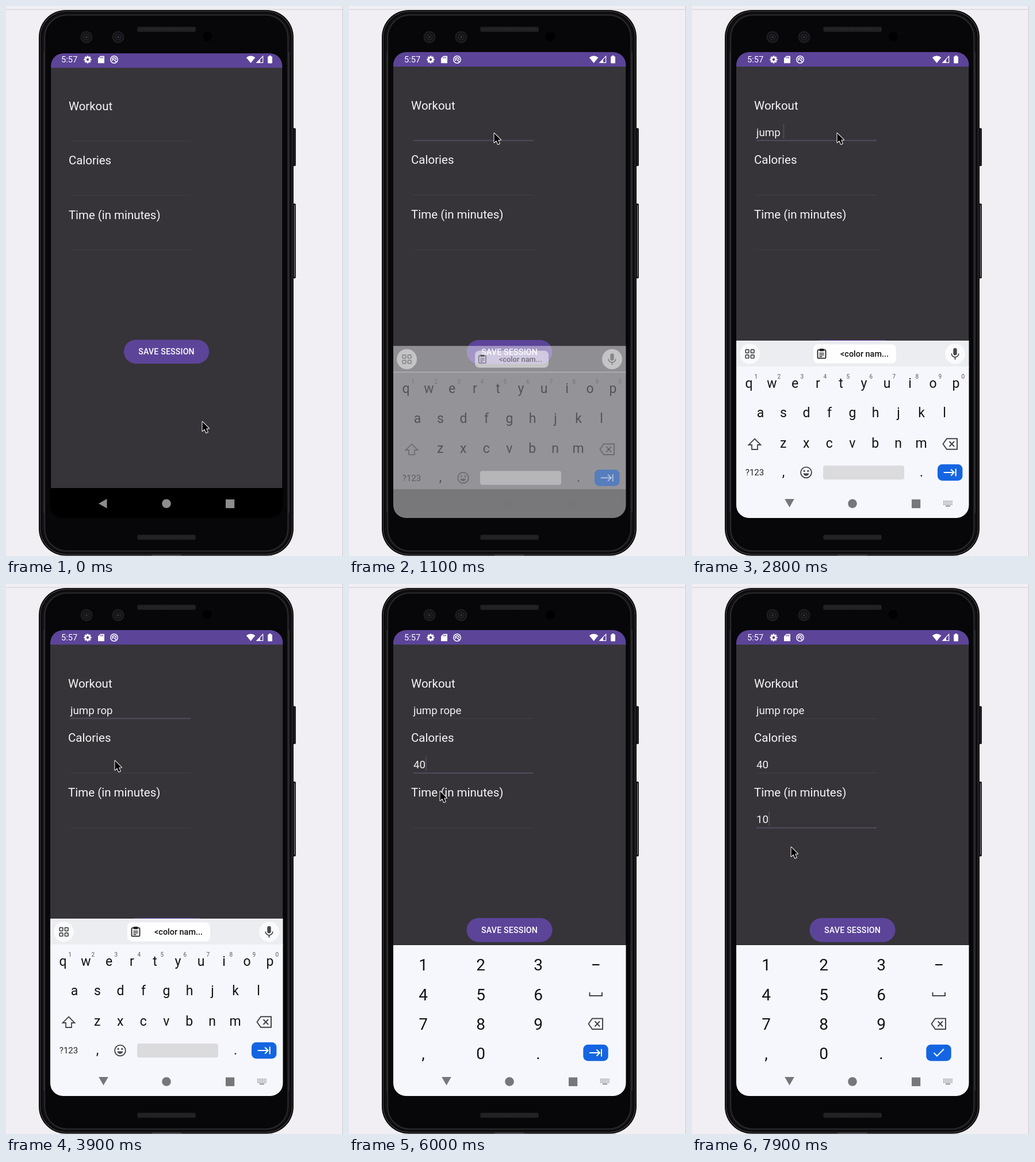
Animation of 586x955 px, one loop 8 s. Source, as an HTML page with a canvas:

```html
<!DOCTYPE html>
<html lang="en">
<head>
<meta charset="utf-8">
<title>Workout form</title>
<style>
html, body { margin: 0; width: 100%; height: 100%; overflow: hidden; background: #f1eff3; }
canvas { display: block; width: 586px; height: 955px; }
</style>
</head>
<body>
<canvas id="stage"></canvas>
<script>
const W = 586, H = 955, LOOP = 8000, STEP = 100;
const canvas = document.getElementById('stage');
const dpr = window.devicePixelRatio || 1;
canvas.width = W * dpr;
canvas.height = H * dpr;
const c = canvas.getContext('2d');

const PURPLE = '#5c4499', DARK = '#363438', KEYS = '#f6f7fc', INK = '#111214', ICON = '#44464b', BLUE = '#1565e2';

// [time, x, y]
const mousePath = [
  [0, 341, 721], [200, 341, 721], [850, 252, 220], [3600, 252, 220], [3900, 189, 306],
  [5800, 189, 306], [6000, 158, 359], [6250, 162, 405], [6800, 162, 405], [7100, 172, 456]
];
const fields = [
  { label: 'Workout', y: 233.5, focus: 1000, blur: 4500, value: 'jump rope',
    typed: [1900, 2000, 2150, 2300, 2500, 3000, 3150, 3300, 4000] },
  { label: 'Calories', y: 328.3, focus: 4500, blur: 6400, value: '40', typed: [5500, 5700] },
  { label: 'Time (in minutes)', y: 423.4, focus: 6400, blur: LOOP, value: '10', typed: [7300, 7500] }
];

const clamp = v => Math.max(0, Math.min(1, v));
const easeOut = p => 1 - (1 - p) ** 3;
const smooth = p => p * p * (3 - 2 * p);

function rect(x, y, w, h, color) {
  c.fillStyle = color;
  c.fillRect(x, y, w, h);
}
function roundPath(x, y, w, h, r) {
  c.beginPath();
  c.roundRect(x, y, w, h, r);
}
function box(x, y, w, h, r, color) {
  roundPath(x, y, w, h, r);
  c.fillStyle = color;
  c.fill();
}
function frame(x, y, w, h, r, color, lw) {
  roundPath(x, y, w, h, r);
  c.strokeStyle = color;
  c.lineWidth = lw;
  c.stroke();
}
function disc(x, y, r, color) {
  c.beginPath();
  c.arc(x, y, r, 0, Math.PI * 2);
  c.fillStyle = color;
  c.fill();
}
function ring(x, y, r, color, lw) {
  c.beginPath();
  c.arc(x, y, r, 0, Math.PI * 2);
  c.strokeStyle = color;
  c.lineWidth = lw;
  c.stroke();
}
function trace(points, close) {
  c.beginPath();
  points.forEach(([x, y]) => c.lineTo(x, y));
  if (close) c.closePath();
}
function poly(points, color) {
  trace(points, true);
  c.fillStyle = color;
  c.fill();
}
function line(points, color, lw, close) {
  trace(points, close);
  c.strokeStyle = color;
  c.lineWidth = lw;
  c.stroke();
}
function text(str, x, y, size, color, align = 'left', weight = 400) {
  c.font = `${weight} ${size}px Roboto, "Open Sans", sans-serif`;
  c.textAlign = align;
  c.fillStyle = color;
  c.fillText(str, x, y);
}
function at(x, y, draw, scale = 1, angle = 0) {
  c.save();
  c.translate(x, y);
  c.rotate(angle);
  c.scale(scale, scale);
  draw();
  c.restore();
}

function speaker(y) {
  box(228, y, 102, 9, 3, '#1d1d1f');
  for (let x = 231; x < 329; x += 3) rect(x, y + 1.5, 1, 6, '#2c2c2e');
}
function camera(x) {
  disc(x, 54, 10.5, '#1e1e20');
  disc(x, 54, 8, '#111114');
  ring(x, 54, 5, '#2a2b31', 1.2);
  disc(x, 54, 2.2, '#292d39');
}
function phone() {
  rect(0, 0, W, H, '#f1eff3');
  rect(0, 5.5, W, 1, '#cfcdd1');
  rect(585, 0, 1, H, '#c9c7cb');
  box(498, 212, 6, 66, 2, '#1b1b1d');
  box(498, 343, 6, 130, 2, '#1b1b1d');
  rect(501, 346, 1.2, 124, '#77777a');
  box(57, 7, 443, 947.5, 47, '#070708');
  frame(59.5, 9.5, 438, 942.5, 45, '#343437', 1.6);
  box(62, 12, 433, 937.5, 43, '#101012');
  frame(67, 15.5, 423.5, 931, 39, '#29292c', 2);
  box(69, 17, 419.5, 928, 37, '#070709');
  rect(65.5, 80, 1, 800, '#3d3d40');
  rect(491.5, 80, 1, 800, '#3d3d40');
  box(253, 951.5, 52, 2.5, 1, '#303033');
  speaker(36);
  speaker(918);
  camera(140);
  camera(195);
  disc(350, 53, 8, '#000');
}

function statusBar() {
  text('5:57', 96, 98.3, 14.6, '#fff');
  at(142, 93, () => {
    for (let i = 0; i < 8; i++) {
      c.rotate(Math.PI / 4);
      rect(-1.5, -6.5, 3, 4, '#fff');
    }
    ring(0, 0, 3.6, '#fff', 2.4);
  });
  poly([[164, 86.8], [171, 86.8], [171, 99.3], [160, 99.3], [160, 90.8]], '#fff');
  for (let i = 0; i < 3; i++) rect(163.5 + i * 2.2, 88.3, 1.1, 2.6, PURPLE);
  ring(188, 93, 6.2, '#fff', 1.5);
  c.beginPath();
  c.arc(188, 93, 3.3, 2.4, 6.6);
  c.stroke();
  line([[186.5, 92], [191.5, 97]], '#fff', 1.6);
  c.beginPath();
  c.moveTo(425.6, 99);
  c.lineTo(417.8, 89.4);
  c.quadraticCurveTo(425.6, 83.4, 433.4, 89.4);
  c.fillStyle = '#fff';
  c.fill();
  line([[446.7, 87.3], [446.7, 98.3], [436, 98.3]], '#fff', 1.2, true);
  poly([[442, 92], [442, 98.5], [435.5, 98.5]], '#fff');
  box(455.2, 87.5, 7.8, 12, 1.2, '#fff');
  rect(457.4, 86, 3.4, 2, '#fff');
}

function navBar(turn, color) {
  at(168.5 + turn, 864 - turn, () => poly([[-7.5, 0], [7, -8.3], [7, 8.3]], color), 1, -turn * Math.PI / 2);
  disc(279, 864, 7.8, color);
  rect(382, 856.7, 15.2, 15.2, color);
}

function drawField(f, t) {
  const focused = t >= f.focus && t < f.blur;
  text(f.label, 108, f.y - 54, 20.5, '#f5f4f6');
  if (focused) rect(112, f.y - 1, 209, 2, '#504c5d');
  else rect(112, f.y - 0.5, 209, 1, '#424043');
  const shown = f.value.slice(0, f.typed.filter(k => k <= t).length);
  text(shown, 112, f.y - 8, 18.7, '#f3f2f4');
  const last = f.typed.filter(k => k <= t).pop() ?? f.focus + 200;
  if (focused && t >= last && (t - last) % 1000 < 500) {
    rect(112.4 + c.measureText(shown).width, f.y - 28.5, 1.5, 25, '#524e68');
  }
}

function app(t) {
  const s = 1 - 0.0055 * (1 - easeOut(clamp(t / 300)));
  c.save();
  c.translate(279, 472);
  c.scale(s, s);
  c.translate(-279, -472);
  box(77, 80, 404.5, 780, [22, 22, 0, 0], DARK);
  box(77, 80, 404.5, 25.3, [22, 22, 0, 0], PURPLE);
  fields.forEach(f => drawField(f, t));
  box(204.5, 580, 149, 41.7, 20.8, PURPLE);
  c.letterSpacing = '0.2px';
  text('SAVE SESSION', 279, 606.2, 14.2, '#fff', 'center', 500);
  c.letterSpacing = '0px';
  c.restore();
  rect(77, 839 - (1 - s) * 367, 405, 50, '#000');
}

function backspace(x, y) {
  line([[x - 12.5, y], [x - 6, y - 9.3], [x + 12, y - 9.3], [x + 12, y + 9.3], [x - 6, y + 9.3]], ICON, 2, true);
  line([[x - 1.5, y - 4.5], [x + 7, y + 4.5]], ICON, 2);
  line([[x + 7, y - 4.5], [x - 1.5, y + 4.5]], ICON, 2);
}
function actionKey(x, y, done) {
  box(x - 21.7, y - 14.2, 43.4, 28.4, 8, BLUE);
  if (done) return line([[x - 8.5, y], [x - 3, y + 5.5], [x + 9, y - 6.5]], '#fff', 2);
  line([[x - 11, y], [x + 7, y]], '#fff', 2);
  line([[x + 1.5, y - 5.5], [x + 7, y], [x + 1.5, y + 5.5]], '#fff', 2);
  rect(x + 9, y - 6.5, 2, 13, '#fff');
}
function hideKeysIcon() {
  for (let r = 0; r < 3; r++)
    for (let i = 0; i < 6; i++) rect(437 + i * 2.8, 859 + r * 2.9, 1.6, 1.6, '#777a7e');
  rect(441, 867.5, 8, 1.6, '#777a7e');
}

function chip(scale) {
  at(283, 604, () => {
    box(-72, -16.5, 144, 33, 8, '#fefefe');
    frame(-64.5, -6.8, 14, 14.5, 1.5, '#222', 1.8);
    rect(-61.2, -9, 7.4, 4.5, '#222');
    for (let i = 0; i < 3; i++) rect(-61.5, -2 + i * 3, i < 2 ? 8 : 5, 1.5, '#222');
    text('<color nam...', 59, 5, 14.4, '#111', 'right', 500);
  }, scale);
}

function letters(chipScale) {
  rect(77, 581, 405, 46, '#ecedf0');
  rect(77, 626, 405, 263, KEYS);
  disc(100.5, 604, 17.5, '#fafafc');
  for (const x of [93.2, 102.4]) for (const y of [596.7, 605.9]) frame(x, y, 5.6, 5.6, 1, ICON, 1.7);
  disc(457.5, 604, 17.5, '#fafafc');
  box(454.3, 594, 6.4, 12.5, 3.2, ICON);
  c.beginPath();
  c.arc(457.5, 603.5, 6.3, 0, Math.PI);
  c.strokeStyle = ICON;
  c.lineWidth = 1.8;
  c.stroke();
  rect(456.6, 610, 1.8, 4, ICON);
  chip(chipScale);

  const row = (keys, x, y) => [...keys].forEach((k, i) => text(k, x + i * 40, y, 23, INK, 'center'));
  row('qwertyuiop', 99, 663);
  row('asdfghjkl', 119, 714.3);
  row('zxcvbnm', 158.7, 766.5);
  [...'1234567890'].forEach((k, i) => text(k, 111.3 + i * 40, 646.5, 10, '#55575c', 'center'));
  line([[109, 751.5], [119.5, 762], [114, 762], [114, 770], [104, 770], [104, 762], [98.5, 762]], ICON, 1.8, true);
  backspace(449, 760.5);
  text('?123', 109, 815.3, 15, '#25272b', 'center');
  text(',', 159, 817, 23, INK, 'center');
  text('.', 399, 817, 23, INK, 'center');
  ring(198.5, 810, 9.4, ICON, 1.9);
  disc(195.2, 807.3, 1.6, ICON);
  disc(201.8, 807.3, 1.6, ICON);
  c.beginPath();
  c.arc(198.5, 810.8, 5, 0.15, Math.PI - 0.15);
  c.closePath();
  c.fill();
  box(228, 798, 141, 24.3, 4, '#dbdadd');
  actionKey(448.7, 810);
}

function numbers(done) {
  rect(77, 626, 405, 1, '#232225');
  rect(77, 627, 405, 262, KEYS);
  ['123', '456', '789', ',0.'].forEach((keys, r) =>
    [...keys].forEach((k, i) => text(k, 129 + i * 100, 671.3 + r * 51.3, 28, INK, 'center')));
  rect(423, 660, 12.5, 2.2, INK);
  line([[418.5, 709], [418.5, 715], [440, 715], [440, 709]], ICON, 2);
  backspace(429, 763.8);
  actionKey(429, 814, done);
}

function keyboard(t) {
  const p = easeOut(clamp((t - 1050) / 250));
  if (!p) return navBar(0, '#8d8d8d');
  c.save();
  c.globalAlpha = p;
  c.translate(0, 18 * (1 - p));
  if (t < 4700) letters(0.889 + 0.111 * clamp((t - 1200) / 150));
  else numbers(t >= 6500);
  c.restore();
  c.globalAlpha = p;
  hideKeysIcon();
  c.globalAlpha = 1;
  navBar(p, '#76777b');
}

function pointer(t) {
  let i = mousePath.findIndex(k => k[0] > t);
  if (i < 0) i = mousePath.length;
  const a = mousePath[i - 1], b = mousePath[i] || a;
  const p = a === b ? 0 : smooth((t - a[0]) / (b[0] - a[0]));
  at(a[1] + (b[1] - a[1]) * p, a[2] + (b[2] - a[2]) * p, () => {
    trace([[0.5, 1], [0.5, 17], [4.2, 13.6], [7, 20], [9.8, 18.8], [7.1, 12.6], [12, 12.4]], true);
    c.lineJoin = 'round';
    c.lineWidth = 2;
    c.strokeStyle = '#fff';
    c.stroke();
    c.fillStyle = '#000';
    c.fill();
  });
}

function render(t) {
  c.setTransform(dpr, 0, 0, dpr, 0, 0);
  phone();
  c.save();
  roundPath(77, 80, 404.5, 809, 22);
  c.clip();
  rect(77, 80, 405, 809, '#000');
  app(t);
  statusBar();
  keyboard(t);
  c.restore();
  pointer(t);
}

const start = performance.now();
function tick() {
  const t = (performance.now() - start) % LOOP;
  render(Math.floor(t / STEP) * STEP);
  requestAnimationFrame(tick);
}
tick();
</script>
</body>
</html>
```
